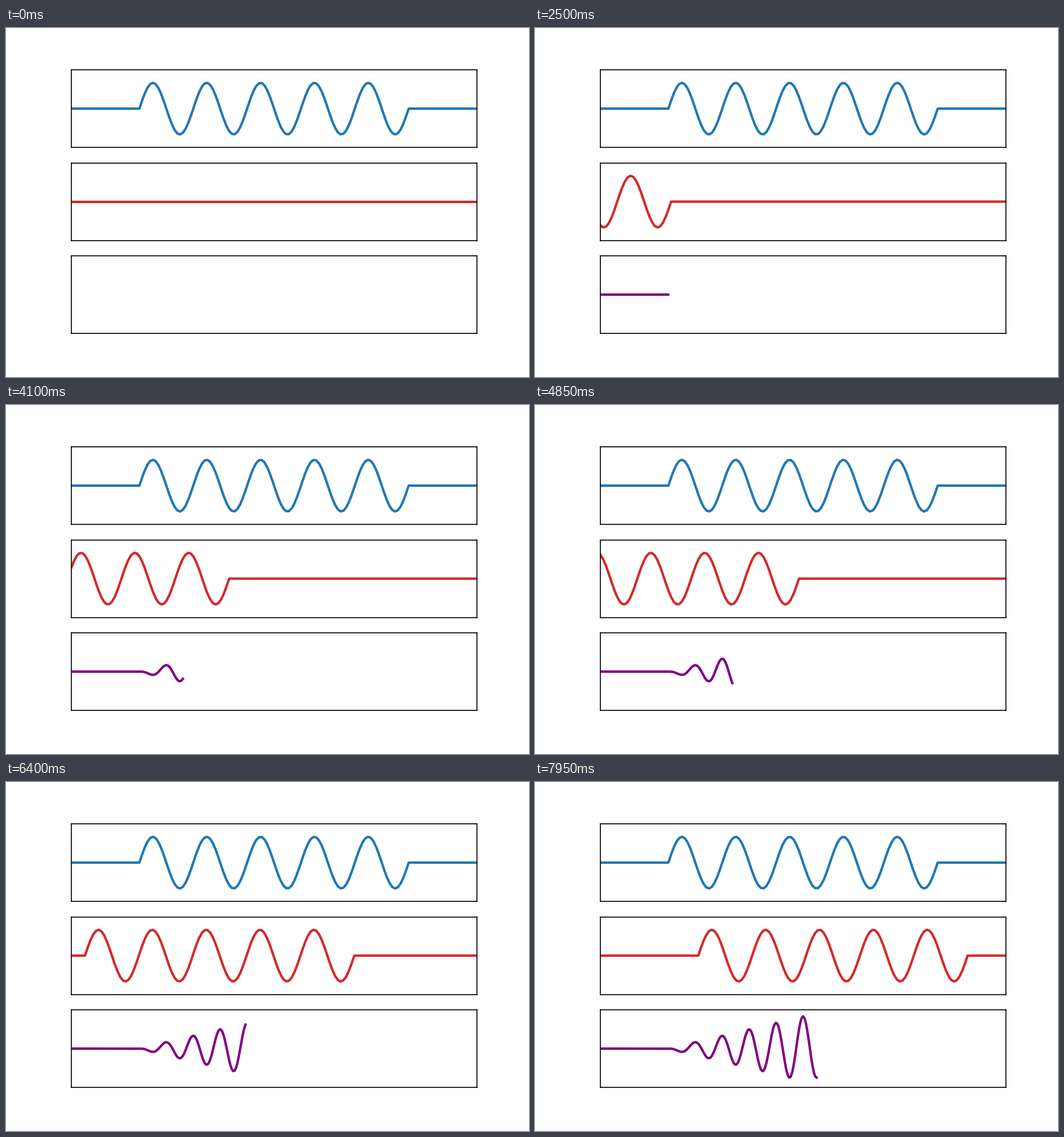
These frames come from a looping animation (864 by 576 pixels, 8000 ms). A matplotlib script:

```python
import numpy as np
import matplotlib.pyplot as plt
from matplotlib.animation import FuncAnimation

FRAMES, INTERVAL = 160, 50
N = 150          # samples per window
PAD = 25         # silence on each side of the burst
ALIGNED = N - 2  # step at which the sliding copy lines up with the fixed wave

burst = np.sin(np.linspace(0, 10 * np.pi, N - 2 * PAD))
signal = np.concatenate([np.zeros(PAD), burst, np.zeros(PAD)])
corr = np.correlate(signal, signal, "full")
corr /= corr.max()

fig, axes = plt.subplots(3, 1, figsize=(6, 4), dpi=144)
fig.set_facecolor("white")
fig.subplots_adjust(left=0.125, right=0.9, bottom=0.125, top=0.88, hspace=0.2)


def make_line(ax, color, xmax, ymax):
    ax.set_xlim(0, xmax)
    ax.set_ylim(-ymax, ymax)
    ax.set_xticks([])
    ax.set_yticks([])
    return ax.plot([], [], color=color, lw=2)[0]


fixed = make_line(axes[0], "tab:blue", N - 1, 1.5)
sliding = make_line(axes[1], "tab:red", N - 1, 1.5)
result = make_line(axes[2], "purple", 2 * N - 2, 1.2)

t = np.arange(N)
fixed.set_data(t, signal)


def shifted(offset):
    """Signal moved right by offset samples, zero-filled."""
    out = np.zeros(N)
    idx = t - offset
    inside = (idx >= 0) & (idx < N)
    out[inside] = signal[idx[inside]]
    return out


def update(step):
    sliding.set_data(t, shifted(step - ALIGNED))
    lags = np.arange(1, step + 1)
    result.set_data(lags, corr[lags])
    return sliding, result


def init():
    return update(0)


anim = FuncAnimation(fig, update, frames=FRAMES, init_func=init,
                     interval=INTERVAL, repeat=True, repeat_delay=0)
plt.show()
```
